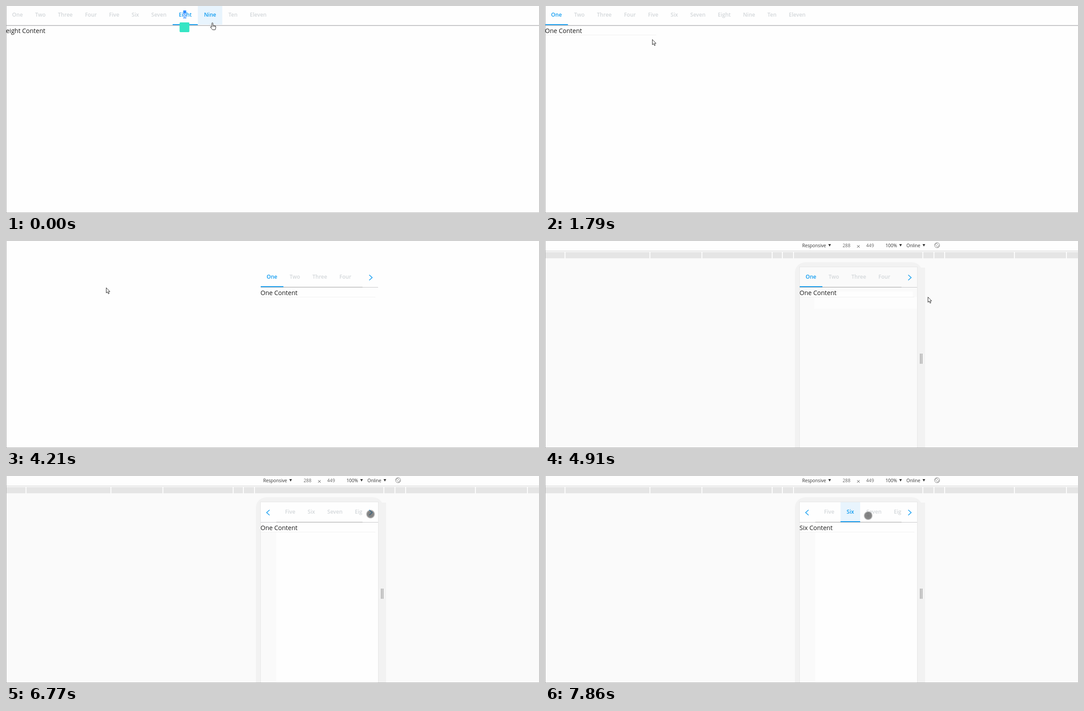
Recreate the animation shown at these times as an HTML page with a canvas. Size 1199 by 467 pixels, loop 8000 ms.

```html
<!DOCTYPE html>
<html lang="en">
<head>
<meta charset="utf-8">
<title>Responsive tabs</title>
<style>
html, body { margin: 0; width: 100%; height: 100%; overflow: hidden; background: #fefefe; }
canvas { display: block; }
</style>
</head>
<body>
<canvas id="stage" width="1199" height="467"></canvas>
<script>
const ctx = document.getElementById('stage').getContext('2d');
const LOOP = 8000, TICK = 136;
const FAMILY = '"Open Sans", "Noto Sans", sans-serif';
const BLUE = '#109cf1', MUTED = '#d3d7da', GRAY = '#c4c4c6';
const WHITE = '#fefefe', PALE = '#fafafa', FRAME = '#f2f2f2';

const labels = ['One', 'Two', 'Three', 'Four', 'Five', 'Six', 'Seven', 'Eight', 'Nine', 'Ten', 'Eleven'];
const ONE = 0, SIX = 5, EIGHT = 7, ELEVEN = 10;
const BAR_WIDTH = 600;

// Every tab is its label plus equal padding; together they fill the bar.
ctx.font = `600 12px ${FAMILY}`;
const labelWidths = labels.map(label => ctx.measureText(label).width);
const padding = (BAR_WIDTH - labelWidths.reduce((a, b) => a + b)) / labels.length;
const edges = [0];
labelWidths.forEach((w, i) => edges.push(edges[i] + w + padding));

// Moments when the scene changes
const HAND_END = 1500, NARROW = 4210, DEVICE = 4350, SETTLED = 5050, TOUCH = 5180, SCROLL = 5640, TAP = 7580;
const clicks = [{ time: 0, tab: EIGHT }, { time: 560, tab: ELEVEN }, { time: 1370, tab: ONE }, { time: 7730, tab: SIX }];

// Turning points of the pointer: time, x, y
const route = [
  [0, 463, 38], [600, 563, 26], [820, 398, 25], [1364, 27, 24], [1770, 241, 75], [2200, 241, 99],
  [2910, 225, 105], [4350, 225, 105], [4900, 861, 126], [5170, 833, 69], [5780, 820, 86],
  [6800, 820, 86], [7450, 692, 88], [7620, 700, 88], [7750, 727, 89.5]
];

const handPath = new Path2D('M4 10.5V2a1.3 1.3 0 0 1 2.6 0V7q1.2-1 2.2.3 1.2-.8 2.1.5 1.6-.5 1.9 1V12.5L11.6 16.5H5.8L1 10.8q-.4-1.6 1.2-1.3z');
const arrowPath = new Path2D('M.5.5V12.2L3.2 9.8 5.2 14.3 7.1 13.4 5.2 9.2H8.8z');

const clamp01 = v => Math.min(1, Math.max(0, v));
const snap = t => Math.max(0, Math.floor((t - 4) / TICK) * TICK + 4);
const activeTab = t => clicks.findLast(click => click.time <= t).tab;

function pointerAt(t) {
  const time = snap(t);
  const next = route.findIndex(point => point[0] > time);
  if (next < 0) return route.at(-1).slice(1);
  const [t0, x0, y0] = route[next - 1], [t1, x1, y1] = route[next];
  const p = (time - t0) / (t1 - t0);
  return [x0 + (x1 - x0) * p, y0 + (y1 - y0) * p];
}

function scrollAt(t) {
  const p = clamp01((snap(t) - SCROLL) / (5 * TICK));
  return p * p * (3 - 2 * p);
}

// The highlight trails the pointer by one tick.
function hoveredTab(t, dx, dy) {
  if (t >= TOUCH && t < TAP) return -1;
  const [x, y] = pointerAt(t - TICK);
  if (y < dy || y > dy + 42) return -1;
  return labels.findIndex((_, i) => x >= edges[i] + dx && x < edges[i + 1] + dx);
}

function rect(x, y, w, h, color) {
  ctx.fillStyle = color;
  ctx.fillRect(x, y, w, h);
}

function roundRect(x, y, w, h, radius, color) {
  ctx.fillStyle = color;
  ctx.beginPath();
  ctx.roundRect(x, y, w, h, radius);
  ctx.fill();
}

function text(str, x, y, size, color, weight = 400, align = 'left') {
  ctx.font = `${weight} ${size}px ${FAMILY}`;
  ctx.textAlign = align;
  ctx.fillStyle = color;
  ctx.fillText(str, x, y);
}

function line(points, color, width) {
  ctx.beginPath();
  points.forEach(([x, y]) => ctx.lineTo(x, y));
  ctx.strokeStyle = color;
  ctx.lineWidth = width;
  ctx.stroke();
}

function clipped(x, y, w, h, draw) {
  ctx.save();
  ctx.beginPath();
  ctx.rect(x, y, w, h);
  ctx.clip();
  draw();
  ctx.restore();
}

function drawTabs(t, dx, dy) {
  const active = activeTab(t), hover = hoveredTab(t, dx, dy);
  labels.forEach((label, i) => {
    const x = edges[i] + dx, w = edges[i + 1] - edges[i];
    const color = i === active || i === hover ? BLUE : MUTED;
    if (i === hover) rect(x, dy - 2, w, 44, '#e8f4fd');
    text(label, x + w / 2, dy + 24.3, 12, color, 600, 'center');
    if (i === active) rect(x, dy + 41, w, 2, BLUE);
  });
}

function drawContent(t, x, y) {
  const tab = activeTab(t);
  const name = tab > SIX ? labels[tab].toLowerCase() : labels[tab];
  text(name + ' Content', x, y, 14, '#1b1b1b');
}

function drawSelection() {
  const left = edges[EIGHT] + padding / 2;
  const before = ctx.measureText('Ei').width, letter = ctx.measureText('g').width;
  const box = [left + before, 10, letter, 18];
  rect(...box, '#338fff');
  clipped(...box, () => text('Eight', left, 24.3, 12, '#fff', 600));
  roundRect(390.5, 37, 22, 22, 2, '#35e5c4');
}

function drawWide(t) {
  rect(1, 43, 1198, 2, GRAY);
  drawTabs(t, 0, 0);
  ctx.font = `600 12px ${FAMILY}`;
  if (t < 160) drawSelection();
  drawContent(t, 0, 61);
  if (t >= HAND_END) rect(0, 65, 250, 1, '#f0f0f0');
}

function chevron(x, direction) {
  const tail = x - 3.3 * direction, tip = x + 3.3 * direction;
  line([[tail, 76.5], [tip, 82.5], [tail, 88.5]], BLUE, 1.6);
}

function drawNarrow(t) {
  const scroll = scrollAt(t);
  const left = scroll > 0 ? 608 : 573, width = 802 - left;
  rect(573, 104, 264, 1, GRAY);
  rect(left, 103, width, 1, '#dedede');
  rect(left, 104, width, 1, '#b4b4b4');
  clipped(left, 59, width, 46, () => drawTabs(t, 572.4 - 176.4 * scroll, 61));
  if (scroll > 0) chevron(589.6, -1);
  chevron(820.4, 1);
  drawContent(t, 572.5, 122);
  rect(573, 126, 258, 1, '#f0f0f0');
}

function dropdown(label, x) {
  text(label, x, 13.8, 10.2, '#333');
  const tip = x + ctx.measureText(label).width + 8;
  ctx.beginPath();
  ctx.moveTo(tip - 3, 7);
  ctx.lineTo(tip + 3, 7);
  ctx.lineTo(tip, 12.5);
  ctx.fill();
}

function drawToolbar() {
  dropdown('Responsive', 578.5);
  dropdown('100%', 766);
  dropdown('Online', 813);
  text('288', 669.5, 13.8, 10.2, '#666');
  text('449', 722.5, 13.8, 10.2, '#666');
  line([[702, 9.5], [708, 15]], '#555', 1);
  line([[708, 9.5], [702, 15]], '#555', 1);

  ctx.save();
  ctx.translate(882, 9.5);
  ctx.rotate(Math.PI / 4);
  ctx.strokeStyle = '#777';
  ctx.lineWidth = 0.9;
  ctx.strokeRect(-4.5, -2, 9, 4);
  ctx.beginPath();
  ctx.arc(0, 0, 5.7, 0, 2 * Math.PI);
  ctx.stroke();
  ctx.restore();
}

function drawRuler() {
  rect(1, 25, 1198, 14, '#e5e5e5');
  for (const reach of [145.5, 170.5, 194, 351.5, 468.5, 660]) {
    for (const side of [-1, 1]) rect(Math.round(704.5 + side * reach) - 1, 25, 2, 14, WHITE);
  }
}

function drawDevice(t) {
  rect(1, 23, 1198, 443, PALE);
  rect(1, 22, 1198, 1, '#cfcfcf');
  drawRuler();
  drawToolbar();

  roundRect(562, 48, 287, 440, 24, FRAME);
  rect(838, 60, 17, 406, FRAME);
  rect(572, 58, 266, 408, '#e6e6e6');
  rect(573, 59, 264, 407, t < SETTLED ? PALE : WHITE);
  if (t < SETTLED) {
    rect(573, 114, 254, 12, WHITE);
    rect(606, 126, 231, 27, '#fdfdfd');
  } else {
    rect(573, 127, 35, 339, PALE);
  }
  for (const x of [843.7, 847.2]) rect(x, 254, 1.5, 23, '#929292');
}

function drawTouch() {
  const glow = ctx.createRadialGradient(0, 0, 0, 0, 0, 10.5);
  glow.addColorStop(0, 'rgba(70,70,70,.7)');
  glow.addColorStop(0.72, 'rgba(70,70,70,.64)');
  glow.addColorStop(1, 'rgba(90,90,90,0)');
  rect(-11, -11, 22, 22, glow);
}

function drawCursor(path) {
  ctx.fillStyle = '#fff';
  ctx.fill(path);
  ctx.strokeStyle = '#222';
  ctx.lineWidth = 1;
  ctx.stroke(path);
}

function drawPointer(t) {
  ctx.save();
  ctx.translate(...pointerAt(t));
  if (t >= TOUCH) {
    drawTouch();
  } else if (t >= HAND_END) {
    drawCursor(arrowPath);
  } else {
    ctx.translate(-4, -0.8);
    drawCursor(handPath);
    for (const x of [6.7, 8.8, 10.9]) line([[x, 7.2], [x, 10]], '#333', 0.8);
  }
  ctx.restore();
}

function render(t) {
  rect(0, 0, 1199, 467, WHITE);
  if (t >= DEVICE) drawDevice(t);
  if (t >= NARROW) drawNarrow(t);
  else drawWide(t);
  rect(0, 0, 1, 467, '#adadad');
  rect(0, 466, 1199, 1, '#adadad');
  drawPointer(t);
}

const start = performance.now();
function tick() {
  render((performance.now() - start) % LOOP);
  requestAnimationFrame(tick);
}
tick();
</script>
</body>
</html>
```
